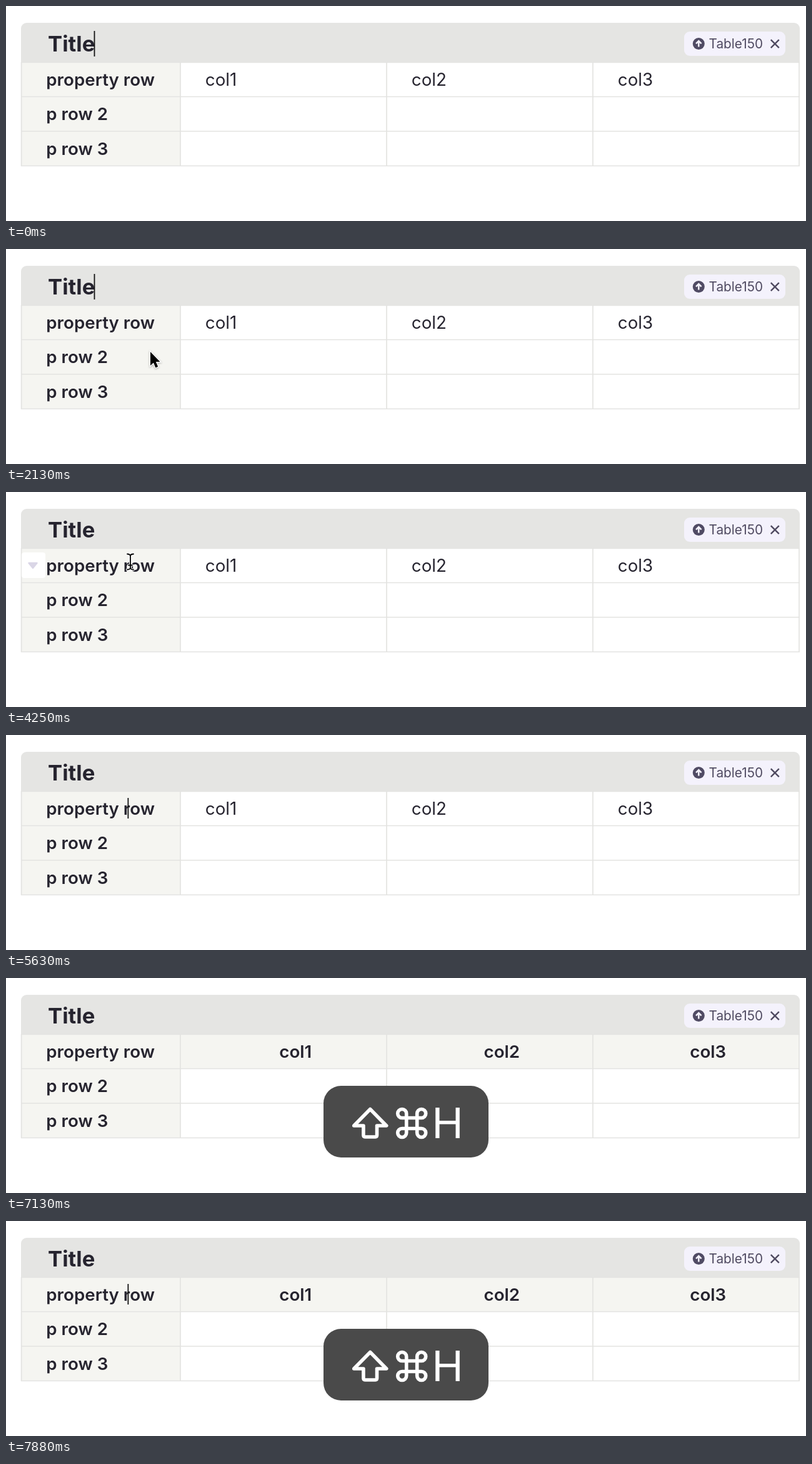
Recreate the animation shown at these times as an HTML page. Size 1280x345 px, loop 8000 ms.

```html
<!DOCTYPE html>
<html lang="en">
<head>
<meta charset="utf-8">
<title>Table header toggle</title>
<style>
html, body { margin: 0; width: 100%; height: 100%; overflow: hidden; background: #fff; }
svg { display: block; width: 1280px; height: 345px; }
text { font: 400 27.75px Inter, Roboto, sans-serif; font-optical-sizing: none; fill: #26242f; white-space: pre; }
.bold { font-weight: 600; }
.title { font-size: 34.7px; font-weight: 700; }
.tag { font-size: 20.8px; fill: #4f4a60; }
.key { font-size: 68px; fill: #fff; text-anchor: middle; }
.mid { text-anchor: middle; }
.grid { fill: none; stroke: #e3e3e1; stroke-width: 1.7; }
.caret { stroke: #111; stroke-width: 1.8; }
.glyph { fill: none; stroke: #fff; stroke-width: 5.6; stroke-linejoin: round; }
</style>
</head>
<body>
<svg viewBox="0 0 1280 345">
  <path d="M24 91V36a9 9 0 0 1 9-9H1261a9 9 0 0 1 9 9V91Z" fill="#e5e5e3"/>
  <rect x="24" y="91" width="255" height="166" fill="#f5f5f1"/>
  <rect id="band" x="279" y="91" width="990" height="54.5" fill="#f5f5f1"/>
  <path class="grid" d="M24 90.5H1270M24 145.5H1270M24 201H1270M24 256.5H1270M24.6 90V257M279 90V257M609 90V257M939 90V257M1269 90V257"/>

  <g id="handle">
    <rect x="25" y="97" width="38" height="41" rx="4" fill="#fff"/>
    <path d="M36.5 114H49.5L43 122Z" fill="#dad6e6" stroke="#dad6e6" stroke-width="2.4" stroke-linejoin="round"/>
  </g>

  <text class="title" x="67" y="72.5">Title</text>
  <g class="bold" id="rows"></g>
  <g id="plain"></g>
  <g id="heads"></g>

  <rect x="1085" y="41" width="162" height="39" rx="9" fill="#f4f2fc"/>
  <circle cx="1108.3" cy="60.5" r="9.5" fill="#504b64"/>
  <path d="M1108.3 65.5V56.5M1104 60.3L1108.3 56L1112.6 60.3" fill="none" stroke="#f4f2fc" stroke-width="2.5"/>
  <text class="tag" x="1124.5" y="67.7">Table150</text>
  <path d="M1223.8 54.2L1236.8 67.2M1236.8 54.2L1223.8 67.2" stroke="#4f4a60" stroke-width="2.4"/>

  <path class="caret" id="titleCaret" d="M141.5 40V81"/>
  <path class="caret" id="rowCaret" d="M195.4 101V134"/>

  <g id="popup">
    <rect id="plate" y="173" height="115" rx="28" fill="#4a4a4a"/>
    <g class="glyph" id="mods">
      <path d="M608 210.5L634 237H618.8V252Q618.8 255 615.8 255H600.2Q597.2 255 597.2 252V237H582Z"/>
      <path d="M666 217.5A7 7 0 1 0 659 224.5H690A7 7 0 1 0 683 217.5V248.5A7 7 0 1 0 690 241.5H659A7 7 0 1 0 666 248.5Z"/>
    </g>
    <text class="key" id="keyH" x="706.5" y="257.3">H</text>
  </g>

  <path id="arrow" d="M0 0V22L5 17.4L8.4 25.4L12.2 23.8L8.8 16H15.5Z" fill="#000" stroke="#fff" stroke-width="2.6"
    paint-order="stroke" style="filter:drop-shadow(0 1.5px 1.5px rgba(0,0,0,.3))"/>
  <g id="beam" fill="none" stroke-linecap="round">
    <path id="beamShape" stroke="#fff" stroke-width="4" d="M-5 -12.5Q0 -12.5 0 -9Q0 -12.5 5 -12.5M0 -9V9M-5 12.5Q0 12.5 0 9Q0 12.5 5 12.5M-3 5.5H3"/>
    <use href="#beamShape"/>
  </g>
</svg>
<script>
const LOOP = 8000;
const $ = id => document.getElementById(id);

function addText(parent, x, y, str, cls) {
  const el = document.createElementNS("http://www.w3.org/2000/svg", "text");
  el.setAttribute("x", x);
  el.setAttribute("y", y);
  if (cls) el.setAttribute("class", cls);
  el.textContent = str;
  $(parent).append(el);
}

["property row", "p row 2", "p row 3"].forEach((s, i) => addText("rows", 64.3, 127.5 + 55.5 * i, s, "bold"));
["col1", "col2", "col3"].forEach((s, i) => {
  addText("plain", 318.8 + 330 * i, 127.5, s);
  addText("heads", 463.3 + 330 * i, 127.5, s, "bold mid");
});

// Dark second outline over the white halo of the text pointer
const core = $("beamShape").cloneNode();
core.removeAttribute("id");
core.setAttribute("stroke", "#000");
core.setAttribute("stroke-width", 1.8);
$("beam").querySelector("use").replaceWith(core);

// Each table row: start time, then the values held until the next row
const pointer = [
  [0, ""],
  [1880, "arrow", 240, 268], [2000, "arrow", 234, 204], [2130, "arrow", 231, 165],
  [2250, "arrow", 230, 152], [2380, "arrow", 229, 141], [2500, "arrow", 228, 135],
  [2630, "arrow", 228, 130], [2750, "arrow", 228, 127],
  [3500, "beam", 212, 118], [3630, "beam", 199, 112],
  [4750, ""]
];
const keys = [
  [0, 0, ""], [6130, 1, ""], [6500, 1, "H"],
  [7380, 0.6, "H"], [7500, 0.25, "H"], [7630, 0, ""], [7880, 1, "H"]
];

const at = (table, t) => table.findLast(row => row[0] <= t);
const show = (id, on) => $(id).setAttribute("visibility", on ? "visible" : "hidden");
const blink = (t, start) => Math.floor((t - start) / 500) % 2 === 0;

function draw(t) {
  const [, kind, x, y] = at(pointer, t);
  for (const id of ["arrow", "beam"]) {
    show(id, id === kind);
    if (id === kind) $(id).setAttribute("transform", `translate(${x} ${y})`);
  }

  const clicked = t >= 4630;
  show("titleCaret", !clicked && (t < 250 || t >= 750 && blink(t, t < 3000 ? 750 : 630)));
  show("rowCaret", clicked && blink(t, 4630));
  show("handle", t >= 2380 && t < 4750);

  const headed = t >= 6630;
  show("band", headed);
  show("heads", headed);
  show("plain", !headed);

  const [, alpha, letter] = at(keys, t);
  const wide = letter === "H";
  $("popup").setAttribute("opacity", alpha);
  $("plate").setAttribute("x", wide ? 508 : 533);
  $("plate").setAttribute("width", wide ? 264 : 215);
  $("mods").setAttribute("transform", `translate(${wide ? -25.3 : 0} 0)`);
  show("keyH", wide);
}

const begin = performance.now();
function tick() {
  draw((performance.now() - begin) % LOOP);
  requestAnimationFrame(tick);
}
draw(0);
requestAnimationFrame(tick);
</script>
</body>
</html>
```
